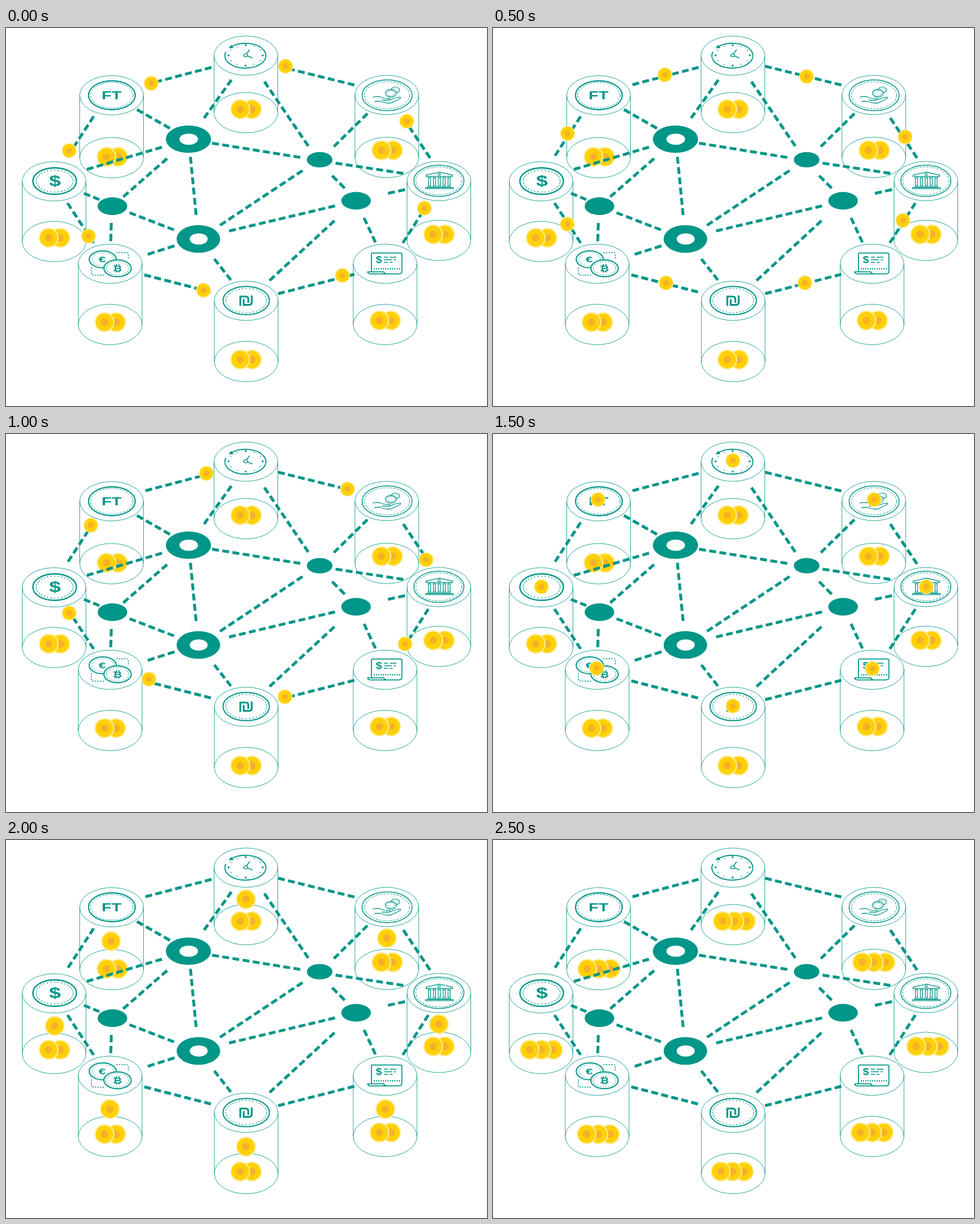
Recreate the animation shown at these times as an HTML page. Size 845 by 663 pixels, loop 3 s.

```html
<!DOCTYPE html>
<html lang="en">
<head>
<meta charset="utf-8">
<title>Coin network</title>
<style>
  html, body { margin: 0; width: 100%; height: 100%; overflow: hidden; background: #fff; }
  svg { display: block; width: 845px; height: 663px; }
  text { font-family: "Liberation Sans", Arial, sans-serif; font-weight: bold; text-anchor: middle; fill: #009688; }
  .line { fill: none; stroke: #009688; }
</style>
</head>
<body>
<svg id="stage" viewBox="0 0 845 663">
  <g id="cylinders" class="line" stroke-width="0.85"></g>
  <g id="stacks"></g>
  <g id="links" class="line" stroke-width="5"></g>
  <g id="hubs"></g>
  <g id="icons"></g>
  <g id="movers"></g>
</svg>
<script>
const TEAL = "#009688";
const LOOP = 3000, STEP = 500;
const layer = id => document.getElementById(id);

// x, lid y, base y, stack y, first x of the pair, first x of the trio, coin path [x, y] for five steps
const cylinders = [
  { x: 421.5, top: 48.5, base: 148.5, stack: 142.5, pair: 411.5, trio: 403.5,
    path: [[255, 97], [302, 82], [352, 69], [421.5, 46.5], [421.5, 104]] },
  { x: 185.5, top: 118, base: 227.5, stack: 226, pair: 176.5, trio: 165.5,
    path: [[111, 215], [131, 185], [149, 160], [184.5, 115], [184.5, 177.5]] },
  { x: 669, top: 117.5, base: 227, stack: 214.5, pair: 659.5, trio: 648.5,
    path: [[491, 67], [551, 85], [600, 96.5], [669.5, 115], [669, 172]] },
  { x: 84.5, top: 269, base: 374.5, stack: 368, pair: 75, trio: 64.5,
    path: [[145, 365], [130.5, 344], [111, 314], [85, 268], [85.5, 326]] },
  { x: 760.5, top: 268.5, base: 372.5, stack: 362, pair: 750.5, trio: 743.5,
    path: [[704, 163.5], [724, 191], [738, 220.5], [761, 268], [760.5, 323]] },
  { x: 183, top: 413.5, base: 520, stack: 516, pair: 173, trio: 164.5,
    path: [[347, 460], [304, 447], [251, 430], [182, 411], [182.5, 472]] },
  { x: 666, top: 413.5, base: 520, stack: 513, pair: 656, trio: 645.5,
    path: [[735, 316], [720, 337.5], [701, 368], [666.5, 411.5], [666.5, 472]] },
  { x: 422, top: 478.5, base: 585, stack: 581.5, pair: 411.5, trio: 400,
    path: [[591, 434], [548, 447], [490, 461], [421.5, 477], [421.5, 538]] }
];

const links = `245 99.5 361 69,478 67 612 100,154 155 109 224,698 158 745 228,
  108 307 154 377,742 307 697 377,243 433 360 463,612 432 478 466,
  230 143 288 176,396 91 348 158,454 94 531 207,635 150 576 208,
  362 202 517 227,579 237 698 255,274 209 142 248,283 229 206 296,
  324 226 334 328,521 250 376 346,573 259 595 281,671 290 701 283.5,
  578 312 392 356,629 333 649 376,577 338 463 443,137 290 164 301,
  217 324 295 354,185 342 184 374,249 397 296 382,366 405 395 442`;

const ellipse = (x, y, rx, ry, attrs = "") =>
  `<ellipse cx="${x}" cy="${y}" rx="${rx}" ry="${ry}" ${attrs}/>`;

const ring = (x, y, rx, ry, width, dash = "", fill = "none") =>
  ellipse(x, y, rx, ry, `fill="${fill}" stroke="${TEAL}" stroke-width="${width}" stroke-dasharray="${dash}"`);

const path = (d, width, extra = "") =>
  `<path class="line" d="${d}" stroke-width="${width}" ${extra}/>`;

// Lettering lies on the flattened lids, so it shares their wide projection.
const glyph = (str, x, y, size, wide = 1.4) =>
  `<text transform="translate(${x} ${y}) scale(${wide} 1)" font-size="${size}">${str}</text>`;

function dots(x, y, rx, ry, count, r) {
  let out = "";
  for (let i = 0; i < count; i++) {
    const a = i / count * 2 * Math.PI;
    out += `<circle cx="${x + rx * Math.cos(a)}" cy="${y + ry * Math.sin(a)}" r="${r}" fill="${TEAL}"/>`;
  }
  return out;
}

const coin = (x, y, r) => `<g transform="translate(${x} ${y}) scale(${r / 17.5})">
  <circle r="17.5" fill="#fdec94"/><circle r="15.3" fill="#ffd005"/><circle r="6.5" fill="#f4b128"/></g>`;

function stack(x, y, count) {
  let out = "";
  for (let i = count - 1; i >= 0; i--) out += coin(x + i * 20.5, y, 17.5);
  return out;
}

function link(spec) {
  const [x1, y1, x2, y2] = spec.trim().split(" ").map(Number);
  const len = Math.hypot(x2 - x1, y2 - y1), gap = 6;
  const n = Math.round((len + gap) / 18);
  const dash = (len - (n - 1) * gap) / n;
  return `<path d="M${x1} ${y1}L${x2} ${y2}" stroke-dasharray="${dash} ${gap}"/>`;
}

const clockIcon = () =>
  path("M395 33.2A36 21.8 0 1 1 386.2 42", 2) +
  `<path d="M391 35.5L395.5 29.5L400 35.2Z" fill="${TEAL}"/>` +
  dots(421, 48, 30, 18, 12, 0.9) + dots(421, 48, 30, 18, 4, 1.8) +
  path("M422 46L428 38M424 49L433 52.5", 1.6) +
  ring(421, 48, 3.4, 2.6, 1.4, "", "#fff");

const tokenIcon = () =>
  ring(186, 118, 41, 25.3, 2.2) + ring(186, 118, 37.2, 22.6, 0.9, "4 2") +
  glyph("FT", 185.5, 125.3, 21, 1.36);

const handIcon = () =>
  ring(669.5, 118, 44, 27, 1.5) + ring(669.5, 118, 39.5, 23.8, 0.9, "4 2") +
  ring(684, 108.5, 7.5, 5, 1.2) + ring(684, 108.5, 4.5, 2.8, 0.8, "1.5 1") +
  ring(676, 114.5, 9.5, 6.5, 1.3, "", "#fff") + ring(676, 114.5, 6.5, 4.2, 0.9, "1.5 1") +
  path("M644 121.5Q653 118.5 659 121.5Q664 124 674 123.5Q677 125.5 673 126.5H660M675 126Q686 121 693 121.5Q694 123 690 125L676 131.5Q668 132.5 660 129.5Q653 127.5 647 129.5", 1.3);

const dollarIcon = () =>
  ring(85.5, 268.5, 38.3, 23.3, 2.4) + dots(85.5, 268.5, 32.5, 19.3, 32, 1) +
  glyph("$", 86, 276.5, 25, 1.48);

function bankIcon() {
  let out = ring(760.5, 268, 44, 27.5, 1.5) + ring(760.5, 268, 40.5, 24.6, 0.9, "4 2");
  for (let i = 0; i < 5; i++) {
    const x = 744 + i * 8.6;
    out += path(`M${x - 1.8} 263V276M${x + 1.8} 263V276M${x - 3} 262.6H${x + 3}M${x - 3} 276.4H${x + 3}`, 1.3);
  }
  return out + path("M738 260.5V258L761 252.8L784.5 258V260.5ZM740 278.7H782M737 281.8H786V279.8H737Z", 1.3) +
    ring(761, 256.8, 2.3, 1.7, 1.1);
}

const exchangeIcon = () =>
  path("M194 394H211Q215 394 215 397V406M150 420V430Q150 433.5 154 433.5H173", 1.5, `stroke-dasharray="2.5 2"`) +
  ring(170, 405.8, 23.8, 14.8, 2) + dots(170, 405.8, 19.3, 11.6, 24, 0.7) +
  glyph("€", 169, 411, 15, 1.5) +
  ring(196, 421.5, 24, 14.8, 2, "", "#fff") + dots(196, 421.5, 19.8, 11.8, 26, 0.7) +
  glyph("B", 196.5, 426.6, 14.5, 1.35) +
  path("M194 414V417M198.5 414V417M194 426V429M198.5 426V429M189 417.3H193M189 425.7H193", 1.7);

const chequeIcon = () =>
  path("M642 427V397Q642 394.7 644.5 394.7H693Q695.5 394.7 695.5 397V427Q695.5 431.3 690 431.3H640.5Q635.5 431.3 635.5 427.6H663.5Q664.5 430.8 668 431.3", 1.8) +
  glyph("$", 655, 411.5, 16, 1.2) +
  path("M664 402H671M674 402H686M664 406.5H678M681 406.5H685M664 411H671M674 411H679", 1.5) +
  path("M646 422.3H693", 2.2, `stroke-dasharray="2 2"`);

const shekelIcon = () =>
  ring(422, 478, 40.7, 24.8, 2) + dots(422, 478, 35.8, 21.3, 36, 0.9) +
  path("M411.7 487.3V471H421Q425.7 471 425.7 475.5V482M417.6 475.5V485.7H426Q431.7 485.7 431.7 481V469.3", 3.2);

function build() {
  layer("cylinders").innerHTML = cylinders.map(c =>
    ellipse(c.x, c.top, 56, 34.5) + ellipse(c.x, c.base, 56, 35.5) +
    `<path d="M${c.x - 56} ${c.top}V${c.base}M${c.x + 56} ${c.top}V${c.base}"/>`).join("");
  layer("links").innerHTML = links.split(",").map(link).join("");
  const solid = `fill="${TEAL}"`, hole = `fill="#fff"`;
  layer("hubs").innerHTML =
    ellipse(320.5, 195, 39.7, 24, solid) + ellipse(321, 195, 16.3, 9.8, hole) +
    ellipse(338, 370, 38.3, 24.3, solid) + ellipse(338.5, 370, 15.8, 9.8, hole) +
    ellipse(551, 231, 22.5, 13.5, solid) + ellipse(187, 312.5, 26, 15.5, solid) +
    ellipse(615, 303, 26, 15.5, solid);
  layer("icons").innerHTML = [clockIcon, tokenIcon, handIcon, dollarIcon,
    bankIcon, exchangeIcon, chequeIcon, shekelIcon].map(draw => draw()).join("");
}

let shown = -1;

// Coins hop in hard steps: three along the link, one on the lid, one falling, then stacked.
function render(time) {
  const step = Math.floor(time % LOOP / STEP);
  if (step === shown) return;
  shown = step;
  const landed = step === 5;
  layer("stacks").innerHTML = cylinders.map(c =>
    stack(landed ? c.trio : c.pair, c.stack, landed ? 3 : 2)).join("");
  layer("movers").innerHTML = landed ? "" : cylinders.map(c =>
    coin(...c.path[step], step === 4 ? 17.5 : 13.2)).join("");
}

function tick() {
  render(performance.now());
  requestAnimationFrame(tick);
}

build();
tick();
</script>
</body>
</html>
```
